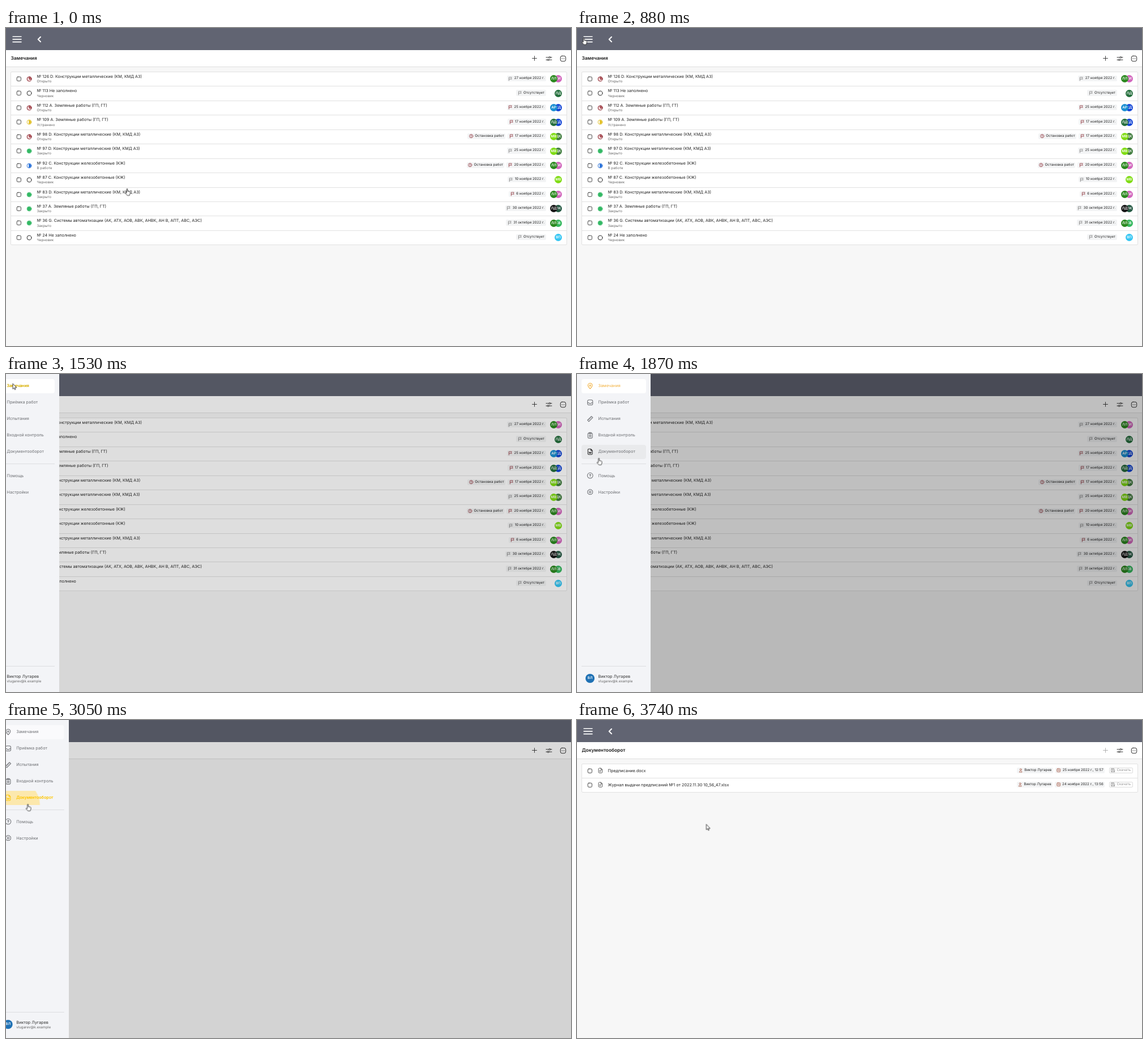
Write an HTML page that moves like this. It is 998 px wide and 561 px high and loops after 3.92 s.

```html
<!DOCTYPE html>
<html lang="ru">
<head>
<meta charset="utf-8">
<title>Замечания</title>
<style>
html, body { margin: 0; width: 100%; height: 100%; overflow: hidden; }
body { position: relative; background: #f7f7f7; color: #222; font: 7.28px/10px Inter, "Open Sans", sans-serif; text-rendering: geometricPrecision; }
div, span.a, svg.a { position: absolute; box-sizing: border-box; white-space: nowrap; }
svg { display: block; fill: none; stroke: currentColor; stroke-width: 1.6; stroke-linecap: round; stroke-linejoin: round; overflow: visible; flex: none; }
.page { inset: 0; }
#list { font-size: 7.18px; }
.head { left: 0; top: 0; width: 998px; height: 39px; background: #616472; color: #fff; }
.tool { left: 0; top: 39px; width: 998px; height: 30px; background: #fff; border-bottom: 1px solid #dfdfdf; }
.title { left: 8.5px; top: 48.7px; font-size: 8.32px; font-weight: 600; color: #1a1a1a; }
.box { left: 8px; top: 77px; width: 983px; background: #fff; border: 1px solid #e1e1e1; border-radius: 2px; }
.row { left: 9px; width: 981px; border-top: 1px solid #e1e1e1; }
.row.first { border-color: transparent; }
.row > * { margin-top: -1px; }
.small { font-size: 6.2px; color: #666; }
.chips { height: 100%; display: flex; align-items: center; gap: 4px; }
.chip { position: static; display: flex; align-items: center; gap: 3px; height: 10.4px; padding: 0 2.5px; border-radius: 2px; background: #f3f4f5; font-size: 6.16px; }
.get { background: #fff; border: .6px solid #dcdcdc; color: #929292; }
.ava { width: 13px; height: 13px; border-radius: 50%; color: #fff; font-size: 6.2px; font-weight: 600; line-height: 13px; text-align: center; }
#shade { inset: 0; background: #000; opacity: 0; }
#menu { left: 0; top: 0; width: 130px; height: 561px; background: #f3f4f7; transform: translateX(-130px); color: #6d6f73; }
.item { left: 8px; width: 114px; height: 25px; border-radius: 4px; overflow: hidden; }
.item svg { left: 9.8px; top: 7.3px; }
.item span { left: 29.5px; top: 7.5px; }
.line { left: 8px; width: 114px; height: 1px; background: #dcdde0; }
#back { inset: 0; background: #fff; }
#hover { inset: 0; background: #e9eaec; opacity: 0; }
#ripple { left: -26.7px; top: -32.5px; width: 114px; height: 114px; border-radius: 50%; background: #fce8ad; transform: scale(0); }
#cursor { left: 0; top: 0; }
#click { left: -6.5px; top: -5.5px; width: 12.6px; height: 12.6px; border-radius: 50%; background: #f6e92fc8; opacity: 0; }
#cursor svg { left: 0; top: 0; color: #111; stroke-width: .8; fill: #fff; }
</style>
</head>
<body>
<div class="page" id="list"><div class="title">Замечания</div></div>
<div class="page" id="docs"><div class="title">Документооборот</div></div>
<div id="shade"></div>
<div id="menu"></div>
<div id="cursor">
  <div id="click"></div>
  <svg class="a" id="hand" width="10" height="13"><path transform="translate(-4 -.3)" d="M3.1 7.6V1.3a.9.9 0 0 1 1.8 0V4.7l3.3.7c1 .2 1.4.8 1.3 1.7l-.5 3-.9 2.1H4.2L.8 8.4c-.4-.7.4-1.5 1.1-1z"/></svg>
  <svg class="a" id="arrow" width="7" height="11"><path d="M0 0V9.2L2.1 7.3 3.6 10.4 4.9 9.8 3.5 6.8H6.4Z"/></svg>
</div>
<script>
const $ = s => document.querySelector(s);
const add = (s, html) => $(s).insertAdjacentHTML('beforeend', html);

// Icons are drawn on a 16-unit grid.
const ICONS = {
  plus: '<path d="M8 1V15M1 8H15"/>',
  tune: '<path d="M0 4.5H8M12.5 4.5H16M0 11.5H3.5M8 11.5H16"/><circle cx="10.2" cy="4.5" r="2.2"/><circle cx="5.8" cy="11.5" r="2.2"/>',
  more: '<rect x=".5" y=".5" width="15" height="15" rx="4.5"/><path d="M4.5 8h.1M8 8h.1M11.5 8h.1" stroke-width="2"/>',
  flag: '<path d="M3 15V2H13.5L11 5.5 13.5 9H3"/>',
  warn: '<circle cx="8" cy="8" r="6.7"/><path d="M8 4.2V8.7M8 11.4v.1" stroke-width="2"/>',
  user: '<circle cx="8" cy="5" r="3.2"/><path d="M3 14.5C3 8.5 13 8.5 13 14.5Z"/>',
  date: '<rect x="1.5" y="1.5" width="13" height="13" rx="3.5"/><path d="M4.5 6H11.5M4.5 10H7M9.5 10H11.5"/>',
  save: '<path d="M2 2H11.5L14.5 5V14.5H2ZM5 2V6H10.5V2M4.5 14V9.5H12V14"/>',
  doc: '<path d="M2 2.5Q2 0 4.5 0H10L14.5 4.5V13.5Q14.5 16 12 16H4.5Q2 16 2 13.5ZM10 0V4.5H14.5M5.5 8H11M5.5 11.5H9"/>',
  pin: '<path d="M8 15.5C4.5 12 2 9.5 2 6.3A6 6 0 0 1 14 6.3C14 9.5 11.5 12 8 15.5Z"/><circle cx="8" cy="6.5" r="2"/>',
  inbox: '<rect x="1" y="1" width="14" height="14" rx="3.5"/><path d="M1 9H4.5L6 11.3H10L11.5 9H15"/>',
  ruler: '<path d="M.8 11.5 11.5.8 15.2 4.5 4.5 15.2ZM9 3.3 10.7 5M6.4 6 8 7.6M3.7 8.6 5.4 10.3"/>',
  board: '<rect x="1.8" y="2" width="12.4" height="13.6" rx="2.5"/><path d="M5 .5H11V3.5H5ZM5 7.5H11M5 11H11"/>',
  word: '<path d="M2 2.5Q2 .5 4 .5H10L14 4.5V13.5Q14 15.5 12 15.5H4Q2 15.5 2 13.5ZM10 .5V4.5H14M5 8.5 6.3 12.3 8 9.5 9.7 12.3 11 8.5"/>',
  help: '<circle cx="8" cy="8" r="7.5"/><path d="M6.2 6.5C6.2 3.9 9.8 3.9 9.8 6.4 9.8 7.7 8 7.8 8 9.2M8 11.5v.1"/>',
  gear: '<path d="M5.5 1.3H10.5L12.3 2.8 14.8 5.2V10.8L12.3 13.2 10.5 14.7H5.5L3.7 13.2 1.2 10.8V5.2L3.7 2.8Z"/><circle cx="8" cy="8" r="2.6"/>'
};
const icon = (name, size, color = 'currentColor', attrs = '') =>
  `<svg ${attrs} viewBox="0 0 16 16" width="${size}" height="${size}" color="${color}">${ICONS[name]}</svg>`;
const at = (x, y) => `class="a" style="left:${x}px;top:${y}px"`;

// Header and toolbar
document.body.insertAdjacentHTML('afterbegin', `
  <div class="head"><svg class="a" width="80" height="39">
    <path style="stroke-linecap:butt" d="M11.5 15.2H27.5M11.5 19.9H27.5M11.5 24.6H27.5"/><path d="M61 15.7 56.7 20 61 24.3" stroke-width="2"/></svg></div>
  <div class="tool">
    ${icon('plus', 9, '#333', 'id="plus" ' + at(929, 10))}
    ${icon('tune', 10, '#333', at(953.5, 9.5))}
    ${icon('more', 10, '#333', at(978.5, 9.5))}
  </div>`);

const RED = '#86222b';
const STATES = {
  open: ['Открыто', RED, '<circle r="3.9" fill="#f6dcdd"/><path d="M0 0V-3.9A3.9 3.9 0 0 1 3.9 0Z" fill="#c9777c"/>'],
  draft: ['Черновик', '#2c2c2c', '<circle r="3.9"/>'],
  fixed: ['Устранено', '#e3c22d', '<circle r="3.9"/><path d="M0 -3A3 3 0 0 1 0 3Z" fill="currentColor"/>'],
  done: ['Закрыто', '#31b863', '<circle r="3.9"/><circle r="2.9" fill="currentColor"/>'],
  work: ['В работе', '#2d74da', '<circle r="3.9"/><path d="M0 -3A3 3 0 0 1 0 3Z" fill="currentColor"/>']
};
const AVATARS = { LL: ['ЛЛ', '#2b891f'], EI: ['ЕИ', '#d267bd'], LD: ['ЛД', '#256f3d'], AR: ['АР', '#1b8fd1'], KD: ['КД', '#1547d6'],
  MV: ['МВ', '#80dc14'], DK: ['ДК', '#447f42'], LB: ['ЛД', '#141414'], FK: ['ФК', '#265a44'], BV: ['БВ', '#37b960'], VP: ['ВП', '#35c6f3'] };
const METAL = 'D. Конструкции металлические (КМ, КМД АЗ)', EARTH = 'A. Земляные работы (ГП, ГТ)',
  BETON = 'C. Конструкции железобетонные (КЖ)', NONE = 'Не заполнено';
// number, title, state, date, avatars, red flag, work stopped
const NOTES = [
  [126, METAL, 'open', '27 ноября 2022 г.', 'LL EI'],
  [113, NONE, 'draft', '', 'LD'],
  [112, EARTH, 'open', '25 ноября 2022 г.', 'AR KD', 1],
  [109, EARTH, 'fixed', '17 ноября 2022 г.', 'LD KD', 1],
  [98, METAL, 'open', '17 ноября 2022 г.', 'MV DK', 1, 1],
  [97, METAL, 'done', '25 ноября 2022 г.', 'MV DK'],
  [92, BETON, 'work', '20 ноября 2022 г.', 'LL EI', 1, 1],
  [87, BETON, 'draft', '10 ноября 2022 г.', 'MV'],
  [83, METAL, 'done', '6 ноября 2022 г.', 'LL EI', 1],
  [37, EARTH, 'done', '30 октября 2022 г.', 'LB FK'],
  [36, 'G. Системы автоматизации (АК, АТХ, АОВ, АВК, АНВК, АН В, АПТ, АВС, АЭС)', 'done', '31 октября 2022 г.', 'LL BV'],
  [24, NONE, 'draft', '', 'VP']
];
const chip = (name, color, text, cls = '') => `<div class="chip ${cls}">${icon(name, 7.4, color)}${text}</div>`;
const row = (i, h, html) => `<div class="row ${i ? '' : 'first'}" style="top:${77 + i * h}px;height:${h}px">
  <svg class="a" style="left:9.7px;top:${h / 2 - 3.7}px;stroke-width:.9;color:#333" width="8" height="8"><rect x=".2" y=".2" width="7.2" height="7.2" rx="1.8"/></svg>${html}</div>`;
const faces = codes => codes.split(' ').map((c, i, all) =>
  `<div class="ava" style="left:${all.length > 1 && !i ? 952 : 960}px;top:6.4px;z-index:${2 - i};background:${AVATARS[c][1]}">${AVATARS[c][0]}</div>`).join('');

const H = 25.44, DOC_H = 24.96;
add('#list', `<div class="box" style="height:306px"></div>` + NOTES.map(([n, text, state, date, who, late, stop], i) => {
  const [label, color, shape] = STATES[state];
  return row(i, H, `<svg class="a" style="left:32px;top:13px;stroke-width:1;color:${color}" width="1" height="1">${shape}</svg>
    <span ${at(45.5, 4)}>№ ${n} ${text}</span><span class="a small" style="left:45.5px;top:13.2px">${label}</span>
    <div class="chips" style="right:36.5px">${stop ? chip('warn', RED, 'Остановка работ') : ''}${chip('flag', late ? RED : '#777', date || 'Отсутствует')}</div>
    ${faces(who)}`);
}).join(''));

const OWNER = 'Виктор Лугарев';
const FILES = [['Предписание.docx', '25 ноября 2022 г., 12:57'], ['Журнал выдачи предписаний №1 от 2022.11.30 10_56_47.xlsx', '24 ноября 2022 г., 13:56']];
add('#docs', `<div class="page" id="files"><div class="box" style="height:51px"></div>` + FILES.map(([name, date], i) =>
  row(i, DOC_H, `${icon('doc', 8.4, '#444', at(27.8, 8.4))}<span ${at(45.5, 7.7)}>${name}</span>
    <div class="chips" style="right:57.8px">${chip('user', '#a5553f', OWNER)}${chip('date', '#a5553f', date)}</div>
    <div class="chips" style="right:8.3px">${chip('save', '#888', 'Скачать', 'get')}</div>`)).join('') + '</div>');

// Side menu
const MENU = [['pin', 'Замечания', 8.5], ['inbox', 'Приёмка работ', 37.5], ['ruler', 'Испытания', 66.5], ['board', 'Входной контроль', 95.5],
  ['word', 'Документооборот', 124.7], ['help', 'Помощь', 167], ['gear', 'Настройки', 196]];
const UNDER = { pin: '<div id="back"></div>', word: '<div id="hover"></div><div id="ripple"></div>' };
add('#menu', MENU.map(([name, text, y]) => `<div class="item" id="${name}" style="top:${y}px">${UNDER[name] || ''}
  ${icon(name, 10.4, 'currentColor', 'class="a"')}<span class="a">${text}</span></div>`).join('') + `
  <div class="line" style="top:157.5px"></div><div class="line" style="top:515px"></div>
  <div class="ava" style="left:14.7px;top:528.7px;width:16.6px;height:16.6px;line-height:16.6px;background:#1f71b4">ВЛ</div>
  <span class="a" style="left:37.5px;top:529.3px;color:#333">${OWNER}</span>
  <span class="a small" style="left:37.5px;top:538.4px">vlugarev@k.example</span>`);

// Motion: each step is [ms, value, easing to the next step]
const LOOP = 3920;
const play = (sel, prop, steps, ease = 'linear') => {
  const frames = steps.map(([ms, v, easing = ease]) => ({ offset: ms / LOOP, [prop]: v, easing }));
  frames.push({ offset: 1, [prop]: steps.at(-1)[1] });
  $(sel).animate(frames, { duration: LOOP, iterations: Infinity });
};
const cut = (sel, prop, steps) => play(sel, prop, steps, 'step-end');
const move = (x, y) => `translate(${x}px, ${y}px)`;
const SLIDE = 'cubic-bezier(.4,0,.6,1)';

play('#cursor', 'transform', [
  [0, move(214, 283.5), 'ease-in-out'], [540, move(7, 17.3)], [560, move(7, 17.3)], [610, move(3.5, 17.3)],
  [760, move(3.5, 17.3)], [880, move(12, 17.3)], [1545, move(12, 17.3), 'ease-in-out'],
  [1840, move(38.6, 148.5)], [3420, move(38.6, 148.5), 'ease-in-out'], [3740, move(228.4, 184.4)]]);
cut('#hand', 'opacity', [[0, 1], [1130, 0], [1870, 1], [3190, 0]]);
cut('#arrow', 'opacity', [[0, 0], [1130, 1], [1870, 0], [3190, 1]]);
cut('#click', 'opacity', [[0, 0], [1330, 1], [1430, 0], [2850, 1], [2950, 0]]);

play('#menu', 'transform', [[0, move(-130, 0)], [1352, move(-130, 0), SLIDE], [1632, move(0, 0)],
  [2991, move(0, 0), SLIDE], [3220, move(-130, 0)]]);
play('#shade', 'opacity', [[0, 0], [1350, 0], [1530, .13], [1630, .25], [2991, .25], [3090, .08], [3220, 0]]);

play('#pin', 'color', [[0, '#d9b10a'], [1560, '#d9b10a'], [1700, '#f2ae38'], [2960, '#f2ae38'], [3030, '#6d6f73']]);
play('#pin', 'textShadow', [[0, '0 0 .5px #d9b10a'], [1560, '0 0 .5px #d9b10a'], [1700, '0 0 0 #d9b10a00']]);
play('#back', 'opacity', [[0, 1], [2960, 1], [3090, .45], [3220, 0]]);
cut('#hover', 'opacity', [[0, 0], [1810, 1], [2960, 0]]);
cut('#word', 'color', [[0, '#6d6f73'], [2991, '#fdc70c']]);
cut('#word', 'textShadow', [[0, 'none'], [2991, '0 0 .5px #fdc70c']]);
cut('#word svg', 'color', [[0, '#6d6f73'], [1810, '#222'], [2991, '#fdc70c']]);
play('#ripple', 'transform', [[0, 'scale(0)'], [2950, 'scale(0)'], [3090, 'scale(1)'], [3220, 'scale(2)']]);

cut('#list', 'opacity', [[0, 1], [2991, 0]]);
cut('#docs', 'opacity', [[0, 0], [2991, 1]]);
cut('#files', 'opacity', [[0, 0], [3190, 1]]);
cut('#plus', 'color', [[0, '#333'], [3190, '#aaa']]);
</script>
</body>
</html>
```
